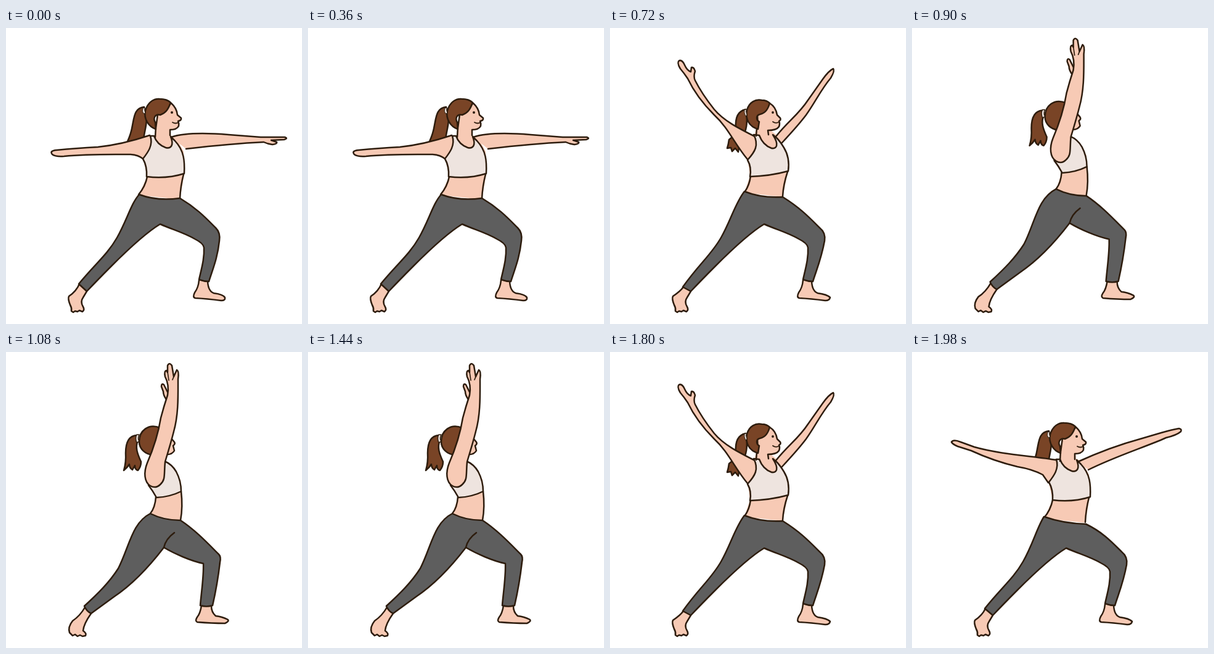
Animation of 480x480 px, one loop 2.16 s. Source, as an HTML page with a canvas:

```html
<!DOCTYPE html>
<html lang="en">
<head>
<meta charset="utf-8">
<title>Yoga stretch</title>
<style>
  html, body { margin: 0; height: 100%; overflow: hidden; background: #fff; }
  canvas { display: block; width: 100vw; height: 100vh; }
</style>
</head>
<body>
<canvas id="stage" width="480" height="480"></canvas>
<script>
const ctx = document.getElementById('stage').getContext('2d');
const STEP = 180;
const INK = '#2d1c0d', SKIN = '#f7cab5', HAIR = '#794426', TOP = '#eee4df', PANTS = '#5e5e5e';

// A part is a path with an optional fill and outline.
const part = (d, fill, width = 2.5) => ({ path: new Path2D(d), fill, width, x: 0, y: 0 });
const skin = d => part(d, SKIN);
const flat = d => part(d, SKIN, 0);
const hair = d => part(d, HAIR);
const line = (d, width = 2.5) => part(d, null, width);
const dot = (x, y, r) => part(`M${x - r} ${y}a${r} ${r} 0 1 0 ${2 * r} 0a${r} ${r} 0 1 0 ${-2 * r} 0`, INK, 0);
const move = (parts, x, y) => parts.map(p => ({ ...p, x: p.x + x, y: p.y + y }));

const ponytail = [
  hair('M224 128C208 130 208 144 205 158Q203 171 197 184L223 182C224 166 231 153 226 138Z')
];

const sideHead = [
  skin('M243 160L242 177M266 174L266 165Q277 165 280 159Q281 155 279 151Q285 150 284 146L278 141Q277 130 268 122L246 140L243 162'),
  hair('M243 164C231 160 223 147 226 134C230 120 240 114 249 115Q261 115 267 121C263 132 259 138 250 141C242 139 238 146 242 153Z'),
  dot(269, 137, 2),
  line('M270 153Q275 156 280 153', 1.8),
  part('M222 130Q220 135 223 139L226 138Q224 133 225 130Z', TOP, 1)
];

const sideTorso = [
  flat('M232 174L242 176L243 160L266 164L267 174L276 178L288 200L289 237L282 278L215 271L229 241L222 210Z'),
  line('M229 241Q226 257 215 270M288 237Q283 256 282 277')
];

const sideTop = [
  part('M234 175C239 190 230 202 222 212Q229 224 228 241Q261 245 289 236C290 216 289 199 274 183L267 176C273 191 267 196 259 194Q245 189 240 175Z', TOP)
];

// Lower body shared by the three open poses.
const lower = (lx, ly, rx, ry, knee, cuff, toe) => [
  skin(`M119 ${cuff}Q114 427 102 435Q100 439 104 449Q107 454 106 459L109 461L112 459L116 460L119 458L124 460Q128 457 125 452Q120 444 125 437L131 427`),
  skin(`M313 409Q312 421 306 429Q302 437 307 438Q326 439 349 442Q356 442 ${toe} 437Q352 432 337 430Q328 427 327 411`),
  part(`M${lx} ${ly}Q245 ${ly + 11} ${rx} ${ry}C309 292 324 308 340 324Q${knee + 2} 332 ${knee} 345C343 373 336 389 329 411Q321 411 313 408C317 390 322 374 321 356Q320 349 306 342C289 332 270 327 250 318C225 333 196 361 171 386Q149 408 131 427L118 ${cuff}C145 382 164 368 180 340C196 312 203 284 ${lx} ${ly}Z`, PANTS)
];

const level = [
  ...ponytail, ...sideTorso,
  skin('M233 174C209 182 178 190 149 193Q113 195 82 198Q70 199 75 205Q80 209 94 208C133 204 175 205 202 205Q215 206 222 212'),
  skin('M268 177C289 170 324 170 361 173Q399 176 413 177L452 177Q458 179 451 181L430 182L439 185Q440 188 432 189Q424 188 418 185C373 187 326 192 292 196'),
  ...sideTop, ...sideHead,
  ...lower(216, 270, 282, 276, 346, 415, 355)
];

const raised = [
  ...move(ponytail, -2, 0), ...move(sideTorso, -1, -1),
  skin('M233 175C198 169 143 166 101 154L79 146Q67 141 64 146Q65 149 74 153L96 160C122 172 146 180 171 186Q195 190 212 199L221 212'),
  skin('M269 178C302 163 333 151 370 141L404 131Q421 126 433 124Q438 125 436 129Q429 135 412 139L403 143C361 160 324 172 286 191'),
  ...move(sideTop, 0, -1), ...move(sideHead, -2, 0),
  ...lower(214, 267, 282, 279, 348, 416, 357)
];

const vee = [
  hair('M220 132C205 135 203 150 204 163Q204 174 193 181Q192 189 190 195L196 194L198 200L203 195L208 201Q209 190 214 179C222 166 223 151 221 138Z'),
  flat('M234 173L239 160L258 164L272 175L288 205L288 235L280 274L218 267L227 240L223 211Z'),
  skin('M237 177C207 162 184 150 169 132C154 113 146 101 138 85Q135 79 138 70Q136 63 132 64L131 71Q125 69 121 60Q117 51 112 53Q108 56 114 66Q120 73 126 82C135 101 150 122 169 141C192 162 202 188 223 213'),
  skin('M269 176C289 151 306 140 321 117L345 83Q355 69 362 66Q365 69 358 81C342 100 333 120 318 141C306 157 292 172 279 186'),
  line('M228 240Q226 255 219 265M288 233Q281 254 280 273'),
  part('M233 173C242 190 235 201 223 214Q230 226 227 241Q260 240 289 232Q292 210 282 194Q276 184 270 178L264 173C275 190 270 196 262 195Q248 190 242 174Z', TOP),
  skin('M238 162L237 175M257 173L256 166Q270 166 274 160Q276 155 274 151Q278 149 276 146L271 141Q269 128 259 122L239 140L240 162'),
  hair('M240 164C226 160 219 148 222 133C226 120 236 115 246 117Q254 117 259 122C256 132 252 138 243 140C236 142 237 149 242 152Z'),
  dot(264, 137, 1.9),
  line('M264 152Q268 155 273 153', 1.8),
  part('M218 133Q217 138 220 143L222 141Q220 136 221 132Z', TOP, 1),
  ...lower(218, 265, 280, 274, 348, 420, 357)
];

const upright = [
  hair('M212 135C197 136 194 151 194 164Q195 179 191 192Q197 187 200 182Q200 188 205 191L209 184Q209 191 214 192Q219 186 219 178C213 165 209 154 214 144Z'),
  skin('M128 414Q120 428 108 436Q100 446 103 455L108 460L112 458L116 461L120 459L124 461L129 460Q131 456 125 452Q126 441 138 424'),
  skin('M317 411Q315 424 310 430Q306 436 310 438Q334 440 355 440Q362 437 360 434Q350 429 340 428Q333 422 333 412'),
  flat('M230 215L258 178L283 207L285 228L283 274L234 264L243 236Z'),
  line('M243 235Q242 252 234 262M284 226Q287 251 283 273'),
  part('M231 216Q238 225 244 236Q266 235 284 226Q284 209 276 194Q269 182 257 177Z', TOP),
  part('M234 262Q256 273 283 273C306 288 326 309 345 328Q349 332 347 341C344 367 340 389 335 411Q325 414 315 411C317 387 321 363 320 343C300 339 273 327 256 317C233 347 205 377 175 397L138 424Q131 421 127 412C150 391 168 373 182 351C200 316 204 277 234 262Z', PANTS),
  line('M256 317Q259 303 273 293'),
  skin('M258 177L259 166Q269 167 273 160L271 152Q275 149 273 146L268 140L245 133'),
  hair('M250 123C231 115 216 128 216 145C216 158 226 165 237 167L250 146Z'),
  part('M212 134Q209 140 212 147L216 145Q213 140 216 134Z', TOP, 1.4),
  skin('M260 77Q255 70 255 64L252 56Q252 50 256 53L262 65'),
  skin('M258 178C256 200 259 207 250 215Q243 222 234 217C224 211 223 195 229 180C239 157 247 132 251 107Q256 88 262 70Q265 53 258 40Q256 31 260 30L262 33L262 22Q265 16 269 22L272 40L277 29Q281 31 279 44C279 69 280 101 272 129Q268 145 258 178'),
  line('M262 32L264 46M272 40L270 45', 1.7)
];

const sway = (x, y, stretch) => ({ x, y, stretch });
const still = sway(0, 0, 1), drift = sway(0.4, 0, 1), reach = sway(-0.4, 0, 1.0045);
const half = [
  [level, drift], [level, still], [raised, still], [vee, still],
  [upright, reach], [upright, still], [upright, drift]
];

function draw([parts, { x, y, stretch }]) {
  const floor = 463;
  ctx.setTransform(1, 0, 0, 1, 0, 0);
  ctx.fillStyle = '#fff';
  ctx.fillRect(0, 0, 480, 480);
  ctx.lineJoin = ctx.lineCap = 'round';
  ctx.strokeStyle = INK;
  for (const p of parts) {
    ctx.setTransform(1, 0, 0, stretch, x + p.x, y + p.y + floor * (1 - stretch));
    if (p.fill) {
      ctx.fillStyle = p.fill;
      ctx.fill(p.path);
    }
    if (p.width) {
      ctx.lineWidth = p.width;
      ctx.stroke(p.path);
    }
  }
}

// The sequence swings back and forth between its two end poses.
const start = performance.now();
let shown = -1;
function tick() {
  const step = Math.floor((performance.now() - start) / STEP) % 12;
  const pose = 6 - Math.abs(6 - (step + 11) % 12);
  if (pose !== shown) draw(half[shown = pose]);
  requestAnimationFrame(tick);
}
tick();
</script>
</body>
</html>
```
